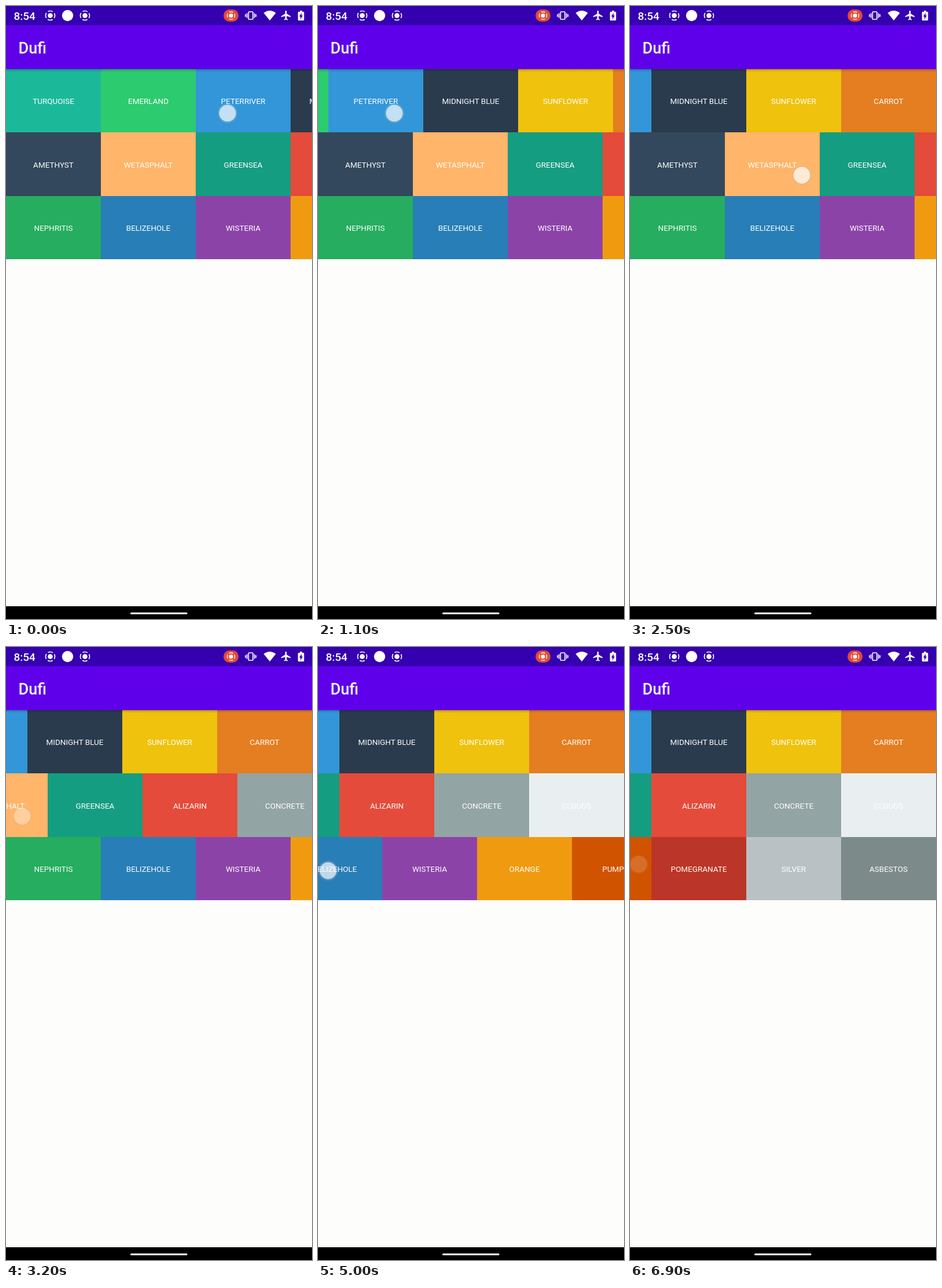
An HTML page for the animation above (7000 ms loop, 529x1058 px).

```html
<!DOCTYPE html>
<html lang="en">
<head>
<meta charset="utf-8">
<title>Colour rows</title>
<style>
  html, body { margin: 0; width: 100%; height: 100%; overflow: hidden; background: #fdfdfc; }
  svg { display: block; width: 100%; height: 100%; }
  text { font-family: Roboto, sans-serif; fill: #fff; }
  .label { font-size: 13.47px; text-anchor: middle; }
  .tile { shape-rendering: crispEdges; }
</style>
</head>
<body>
<svg viewBox="0 0 529 1058">
  <defs>
    <linearGradient id="shade" x2="0" y2="1">
      <stop offset="0" stop-opacity=".2"/>
      <stop offset="1" stop-opacity="0"/>
    </linearGradient>
    <g id="rec">
      <circle r="4.3" fill="#fff"/>
      <circle r="8" fill="none" stroke="#fff" stroke-width="1.7" stroke-dasharray="9 3.566" stroke-dashoffset="4.5"/>
    </g>
  </defs>
  <rect width="529" height="1058" fill="#fdfdfc"/>
  <g id="rows"></g>
  <rect y="109" width="529" height="5" fill="url(#shade)"/>

  <rect width="529" height="109" fill="#5f00ea"/>
  <rect width="529" height="33" fill="#3500af"/>
  <text x="21.6" y="81.8" font-size="27" font-weight="500">Dufi</text>

  <text x="13.5" y="23.7" font-size="18.9" font-weight="500">8:54</text>
  <use href="#rec" x="76.5" y="16.5"/>
  <circle cx="106.5" cy="16.5" r="9.7" fill="#fff"/>
  <use href="#rec" x="136.5" y="16.5"/>
  <rect x="376" y="6" width="26" height="21" rx="10.5" fill="#e44a33"/>
  <use href="#rec" transform="translate(389 16.5) scale(.82)"/>
  <g fill="none" stroke="#fff" stroke-width="1.7">
    <rect x="419.3" y="10" width="7.6" height="13" rx="1"/>
    <path d="M416.6 12.5v8M429.6 12.5v8M414.1 14.3v4.4M432.1 14.3v4.4"/>
  </g>
  <g fill="#fff">
    <path d="M456 25 445.5 12Q456 4 466.5 12Z"/>
    <path d="M492 19.3v-1.8l-6.8-4.3V9.3a1.3 1.3 0 0 0-2.6 0v3.9l-6.8 4.3v1.8l6.8-2.1v4.6l-1.8 1.3v1.4l3.1-.9 3.1.9v-1.4l-1.8-1.3v-4.6Z"/>
    <path d="M508 8h4v2h2q1.3 0 1.3 1.3v12.4q0 1.3-1.3 1.3h-8q-1.3 0-1.3-1.3V11.300q0-1.300 1.300-1.300h2Z"/>
  </g>
  <path d="M511 12v4.500h2.200L509 22.800v-4.600h-2.200Z" fill="#3500af"/>

  <g id="finger">
    <circle r="17" fill="#fff" fill-opacity=".14"/>
    <circle r="15.500" fill="none" stroke="#888" stroke-opacity=".3" stroke-width="1.500"/>
    <circle r="14.500" fill="#fff" fill-opacity=".66"/>
  </g>

  <rect y="1036" width="529" height="22"/>
  <rect x="215" y="1046.800" width="98.500" height="3" rx="1.500" fill="#fff"/>
</svg>
<script>
const LOOP = 7000, STEP = 100, STAGE = 529, TILE = 164, SLOP = 13, FADE = 140;

const rows = [
  { top: 109, bottom: 218, tiles: [
    ['TURQUOISE', '#1bb99a'], ['EMERLAND', '#2ccb6f'], ['PETERRIVER', '#3296d8'],
    ['MIDNIGHT BLUE', '#2a3b4d'], ['SUNFLOWER', '#efc20e'], ['CARROT', '#e47e21']] },
  { top: 218, bottom: 328, tiles: [
    ['AMETHYST', '#33485c'], ['WETASPHALT', '#ffb56a'], ['GREENSEA', '#159d81'],
    ['ALIZARIN', '#e44b3a'], ['CONCRETE', '#93a4a4'], ['CLOUDS', '#e9eff0']] },
  { top: 328, bottom: 437, tiles: [
    ['NEPHRITIS', '#26ad5f'], ['BELIZEHOLE', '#287eb7'], ['WISTERIA', '#8c43a8'],
    ['ORANGE', '#f09b0f'], ['PUMPKIN', '#d05300'], ['POMEGRANATE', '#bb3528'],
    ['SILVER', '#bac1c5'], ['ASBESTOS', '#7d8a8a']] }
];

// Each touch: row, finger height, path of [time, x]; it lifts at the last point.
const touches = [
  { row: 0, y: 185, path: [[0, 383], [450, 216]] },
  { row: 0, y: 185, path: [[560, 301], [600, 301], [1500, 11]] },
  { row: 1, y: 292, path: [[2500, 297], [2750, 240], [2850, 240], [3130, 28]] },
  { row: 1, y: 292, path: [[3600, 246], [4080, 30]] },
  { row: 2, y: 386, path: [[4500, 247], [5050, 12]] },
  { row: 2, y: 380, path: [[5200, 341], [5350, 210], [5450, 210], [5700, 52], [5780, 28]] },
  { row: 2, y: 375, path: [[6000, 289], [6320, 150], [6420, 150], [6790, 15]] }
];

const clamp = v => Math.min(1, Math.max(0, v));
const smooth = v => v * v * (3 - 2 * v);
const finger = document.getElementById('finger');

function add(parent, tag, attrs, text = '') {
  const el = document.createElementNS('http://www.w3.org/2000/svg', tag);
  for (const key in attrs) el.setAttribute(key, attrs[key]);
  el.textContent = text;
  return parent.appendChild(el);
}

rows.forEach((row, r) => {
  row.el = add(document.getElementById('rows'), 'g', {});
  row.max = row.tiles.length * TILE - STAGE;
  row.tiles.forEach(([name, fill], i) => {
    const x = i * TILE;
    add(row.el, 'rect', { class: 'tile', x, y: row.top, width: TILE, height: row.bottom - row.top, fill });
    add(row.el, 'text', { class: 'label', x: x + TILE / 2, y: 169.3 + r * 109.3 }, name);
  });
});

function fingerX(path, t) {
  let x = path[0][1];
  for (let i = 1; i < path.length; i++) {
    const [t0, x0] = path[i - 1], [t1, x1] = path[i];
    if (t >= t0) x = x0 + (x1 - x0) * smooth(clamp((t - t0) / (t1 - t0)));
  }
  return x;
}

function draw(t) {
  // The first row glides on to its end after the second drag.
  const scroll = [24 * (1 - (1 - clamp((t - 1600) / 400)) ** 3), 0, 0];
  let opacity = 0;
  for (const { row, y, path } of touches) {
    const start = path[0][0], lift = path[path.length - 1][0];
    if (t < start) continue;
    const x = fingerX(path, t);
    scroll[row] += Math.max(0, path[0][1] - x - SLOP);
    opacity = 1 - clamp((t - lift) / FADE);
    finger.setAttribute('transform', `translate(${x} ${y})`);
  }
  finger.setAttribute('opacity', opacity);
  rows.forEach((row, r) => {
    const x = Math.round(Math.min(row.max, scroll[r]));
    row.el.setAttribute('transform', `translate(${-x} 0)`);
  });
}

const begin = performance.now();
function tick() {
  const t = (performance.now() - begin) % LOOP;
  draw(Math.floor(t / STEP) * STEP);
  requestAnimationFrame(tick);
}
tick();
</script>
</body>
</html>
```
